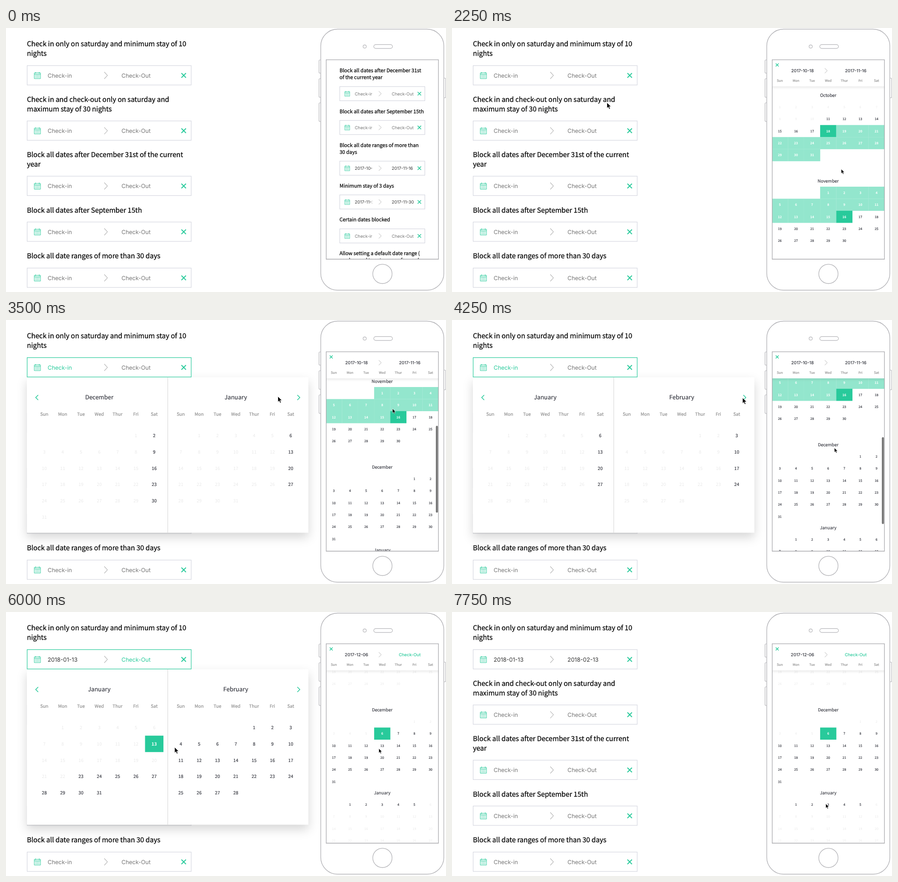
Recreate the animation shown at these times as an HTML page. Size 967 by 579 pixels, loop 9 s.

```html
<!DOCTYPE html>
<html lang="en">
<head>
<meta charset="utf-8">
<title>Date range picker</title>
<style>
  html, body { margin: 0; width: 100%; height: 100%; overflow: hidden; background: #fff; }
  svg { display: block; font-family: "Noto Sans CJK JP", "Noto Sans CJK SC", "Noto Sans CJK", sans-serif; text-rendering: geometricPrecision; }
  .field { font-family: Inter, "Liberation Sans", sans-serif; }
  .line { fill: none; }
  .panel { filter: drop-shadow(0 10px 11px rgba(0, 0, 0, .16)); }
  .hover { filter: drop-shadow(0 1px 3px rgba(0, 0, 0, .4)); }
</style>
</head>
<body>
<svg id="stage" width="967" height="579" viewBox="0 0 967 579"></svg>
<script>
const LOOP = 9000, STEP = 250;
const TEAL = '#28ca9b', RANGE = '#93e6cd', INK = '#2b2d36', OFF = '#e9e9e9', BORDER = '#d5d7e0', OUTLINE = '#b4b4b8';
const WEEK = ['Sun', 'Mon', 'Tue', 'Wed', 'Thur', 'Fri', 'Sat'];
const NAMES = { 9: 'October', 10: 'November', 11: 'December', 12: 'January', 13: 'February' };

// Moments of the story, in ms
const PHONE_OPEN = 2250, PANEL_OPEN = 3000, NEXT_MONTH = 4250, PICKED = 5500, HOVER = 6250, PANEL_CLOSE = 7250;

// Tracks hold each value until the next key
const deskCursor = [[1250, 379, 44], [1500, 347, 123], [1750, 346, 150], [2250, 340, 163], [2500, 294, 104],
  [2750, 288, 101], [3000, 290, 101], [3250, 349, 113], [3500, 597, 167], [3750, 637, 171], [4000, 638, 170],
  [4500, 527, 190], [4750, 368, 234], [5000, 319, 276], [5250, 319, 289], [6000, 370, 296], [6250, 410, 312], [6500, 449, 317]];
const phoneCursor = [[1250, 870, 358], [1500, 829, 335], [1750, 800, 305], [2250, 855, 309], [2500, 851, 314],
  [2750, 853, 370], [3000, 850, 304], [3250, 849, 240], [3500, 849, 194], [3750, 839, 324], [4250, 840, 280],
  [4500, 840, 250], [4750, 841, 236], [5000, 838, 260], [5250, 823, 270], [6000, 819, 299], [6250, 807, 340],
  [6500, 797, 368], [7250, 802, 395], [7500, 817, 419], [7750, 821, 420]];
const scrollTrack = [[0, 0], [3000, 57], [3250, 130], [3500, 201], [3750, 230], [4250, 250], [4500, 290], [4750, 308], [5250, 309]];

const at = (track, t) => track.findLast(key => key[0] <= t);
const dayNo = (month, day) => Date.UTC(2017, month, day) / 864e5;
const weekday = n => (n + 4) % 7;

const text = (x, y, str, size, fill, attrs = '') =>
  `<text x="${x}" y="${y}" font-size="${size}" fill="${fill}" ${attrs}>${str}</text>`;
const centred = (x, y, str, size, fill, attrs = '') => text(x, y, str, size, fill, 'text-anchor="middle" ' + attrs);
const rect = (x, y, w, h, fill, attrs = '') =>
  `<rect x="${x}" y="${y}" width="${w}" height="${h}" fill="${fill}" ${attrs}/>`;
const frame = (x, y, w, h, stroke, r = 0, width = 1.2) =>
  rect(x, y, w, h, '#fff', `rx="${r}" stroke="${stroke}" stroke-width="${width}"`);
const path = (d, stroke, width) => `<path class="line" d="${d}" stroke="${stroke}" stroke-width="${width}"/>`;
const cross = (x, y, r, width) =>
  path(`M${x - r} ${y - r}l${2 * r} ${2 * r}m0 ${-2 * r}l${-2 * r} ${2 * r}`, TEAL, width);
const chevron = (x, y, w, h, stroke, width) => path(`M${x - w} ${y - h}L${x + w} ${y}L${x - w} ${y + h}`, stroke, width);
const heading = (x, y, str, size) => text(x, y, str, size, '#000', 'stroke="#000" stroke-width=".25"');
const cursor = (key, scale) => key ? `<path transform="translate(${key[1]} ${key[2]}) scale(${scale})"
  d="M.5 .5V13L3.4 10.2 5.4 14.9 7.6 14 5.6 9.5H9.5Z" fill="#000" stroke="#fff" stroke-width=".8"/>` : '';

function calendarIcon(x, y, scale) {
  let dots = '';
  for (let i = 0; i < 12; i++) dots += rect(-4.6 + i % 4 * 2.6, -.9 + (i >> 2) * 2.4, 1.4, 1.2, TEAL);
  return `<g transform="translate(${x} ${y}) scale(${scale})">` +
    path('M-6.8 -5.5H6.8V7H-6.8ZM-6.8 -2.3H6.8M-4 -7.5V-4M4 -7.5V-4', TEAL, 1) + dots + '</g>';
}

// A side is [label, colour]
const placeholder = label => [label, '#757575'];
const filled = date => [date, '#333'];
const active = label => [label, TEAL];
const emptySides = [placeholder('Check-in'), placeholder('Check-Out')];

function deskField(y, [from, to] = emptySides, border = BORDER) {
  return frame(46.5, y, 360.5, 42.5, border) + calendarIcon(69, y + 21.5, 1) +
    `<g class="field">${text(91.5, y + 26, from[0], 12.5, from[1])}${text(253.8, y + 26, to[0], 12.5, to[1])}</g>` +
    chevron(219.5, y + 21.5, 3.5, 7.5, '#b5b5b5', 1.1) + cross(390.5, y + 21.5, 5, 2);
}

function phoneField(y, [from, to] = emptySides) {
  return frame(733.5, y, 187, 31, BORDER) + calendarIcon(750, y + 15.5, .8) +
    `<g class="field">${text(766.5, y + 19, from[0], 9.4, from[1])}${rect(804.5, y + 5, 14, 22, '#fff')}
     ${text(847.8, y + 19, to[0], 9.4, to[1])}</g>` +
    chevron(822, y + 15.5, 2.7, 5.5, '#b5b5b5', 1) + cross(908.5, y + 15.5, 3.8, 1.6);
}

// Grid sizes: column pitch, row pitch, title-to-first-row distance, title and day font sizes
const DESK = { dx: 40.25, dy: 35.8, lead: 84.3, title: 13, day: 9.9 };
const PHONE = { dx: 35.4, dy: 26.4, lead: 26.2, title: 9.5, day: 7.2 };

function month(index, x, y, grid, stateOf) {
  const first = dayNo(index, 1), count = dayNo(index + 1, 1) - first;
  let out = centred(x + 3 * grid.dx, y + grid.title * .37, NAMES[index], grid.title, INK, `stroke="${INK}" stroke-width=".12"`);
  for (let d = 0; d < count; d++) {
    const n = first + d, cell = d + weekday(first), state = stateOf(n);
    const cx = x + cell % 7 * grid.dx, cy = y + grid.lead + Math.floor(cell / 7) * grid.dy;
    const back = { range: RANGE, pick: TEAL, hover: '#fff' }[state];
    const ink = { range: '#fff', pick: '#fff', hover: TEAL, on: INK }[state] || OFF;
    if (back) out += rect(cx - grid.dx / 2, cy - grid.dy / 2, grid.dx + .2, grid.dy + .2, back, state == 'hover' ? 'class="hover"' : '');
    out += centred(cx, cy + grid.day * .37, d + 1, grid.day, ink,
      back ? 'font-weight="700"' : state == 'on' ? `stroke="${ink}" stroke-width=".15"` : '');
  }
  return out;
}

const weekdays = (x, y, dx, size) =>
  WEEK.map((name, i) => centred(x + i * dx, y, name, size, '#8e8e8e', 'stroke="#8e8e8e" stroke-width=".2"')).join('');

function panel(t) {
  const start = dayNo(12, 13), end = dayNo(13, t < 6500 ? 12 : 13);
  const stateOf = n => {
    if (t < PICKED) return weekday(n) == 6 ? 'on' : 'off';
    if (n == start) return 'pick';
    if (t >= HOVER && n == end) return 'hover';
    if (t >= HOVER && n > start && n < end) return 'range';
    return n >= start + 10 ? 'on' : 'off';
  };
  const left = t < NEXT_MONTH ? 11 : 12;
  let out = rect(46, 125.5, 618.5, 341, '#fff', 'class="panel"') + path('M355.5 126V466.5', '#d4d4d4', 1) +
    path('M46 467.3H407', '#d0d0d0', .8) +
    chevron(68, 170, -2.7, 5.5, TEAL, 1.6) + chevron(643, 170, 2.7, 5.5, TEAL, 1.6);
  [84.2, 384.2].forEach((x, i) => {
    out += weekdays(x, 209.7, DESK.dx, 9.9) + month(left + i, x, 169, DESK, stateOf);
  });
  if (t >= HOVER) {
    const x = 448.5 - (dayNo(13, 13) - end) * DESK.dx;
    out += rect(x, 285.3, 56.5, 21.5, '#2b2c44', 'rx="2"') +
      `<path d="M${x + 25} 306.5h7l-3.5 3.5z" fill="#2b2c44"/>` +
      centred(x + 28.3, 299.7, `${end - start} Nights`, 9.2, '#fff', 'stroke="#fff" stroke-width=".3"');
  }
  return out;
}

function desk(t) {
  const open = t >= PANEL_OPEN && t < PANEL_CLOSE;
  const from = t >= PICKED ? filled('2018-01-13') : open ? active('Check-in') : emptySides[0];
  const to = t >= PANEL_CLOSE ? filled('2018-02-13') : t >= PICKED ? active('Check-Out') : emptySides[1];
  const lines = [[40, 'Check in only on saturday and minimum stay of 10'], [61, 'nights'],
    [162, 'Check in and check-out only on saturday and'], [183, 'maximum stay of 30 nights'],
    [283, 'Block all dates after December 31st of the current'], [304, 'year'],
    [404.5, 'Block all dates after September 15th'], [505, 'Block all date ranges of more than 30 days']];
  return lines.slice(0, -1).map(([y, str]) => heading(46, y, str, 15)).join('') +
    [203.8, 325, 425.5].map(y => deskField(y)).join('') + (open ? panel(t) : '') +
    deskField(82.5, [from, to], open ? TEAL : BORDER) + heading(46, ...lines.at(-1), 15) + deskField(526.5) +
    (t < PANEL_CLOSE ? cursor(at(deskCursor, t), 1) : '');
}

function phoneForm() {
  const lines = [[97, 'Block all dates after December 31st'], [112, 'of the current year'],
    [187, 'Block all dates after September 15th'], [260.7, 'Block all date ranges of more than'], [275.7, '30 days'],
    [349.5, 'Minimum stay of 3 days'], [424, 'Certain dates blocked'], [498, 'Allow setting a default date range ('],
    [513, 'can be used to set a range forward']];
  return lines.map(([y, str]) => heading(733, y, str, 11)).join('') +
    [128.5, 202.7, 440.5].map(y => phoneField(y)).join('') +
    phoneField(292, [filled('2017-10-18'), filled('2017-11-16')]) +
    phoneField(366, [filled('2017-11-27'), filled('2017-11-30')]);
}

function phoneCalendar(t) {
  const picked = t >= PICKED, scroll = at(scrollTrack, t)[1];
  const start = picked ? dayNo(11, 6) : dayNo(9, 18), end = dayNo(10, 16);
  const stateOf = n => {
    if (n == start || !picked && n == end) return 'pick';
    if (picked) return n > start && n <= start + 30 ? 'on' : 'off';
    return n > start && n < end ? 'range' : n >= dayNo(9, 11) ? 'on' : 'off';
  };
  const titles = [147, 335, 523, 705];
  let out = titles.map((y, i) => month(9 + i, 720.6, y - scroll, PHONE, stateOf)).join('');
  if (t >= PANEL_OPEN && !picked) out += rect(944.7, 130 + scroll * .508, 4.6, 190.5, '#777', 'rx="2.3"');
  return out + rect(704, 70, 246, 58, '#fff') + rect(704, 128, 246, 7, 'url(#fade)') + cross(714.7, 81, 3.2, 1.5) +
    weekdays(720.6, 118.3, PHONE.dx, 7.2) + chevron(822, 93.7, 2.7, 5.5, '#b5b5b5', 1) +
    `<g class="field" font-weight="500">${centred(770.3, 97.3, picked ? '2017-12-06' : '2017-10-18', 9.4, INK)}
     ${centred(887.3, 97.3, picked ? 'Check-Out' : '2017-11-16', 9.3, picked ? TEAL : INK)}</g>`;
}

function phone(t) {
  const buttons = [[688, 70, 29], [688, 111, 41], [688, 164, 41], [960, 110, 43]];
  return buttons.map(([x, y, h]) => frame(x, y, 6.5, h, OUTLINE, 2)).join('') +
    frame(691.7, 2.5, 270.6, 572.5, OUTLINE, 37, 1.4) + frame(808.3, 36.3, 41, 8.6, OUTLINE, 4.3) +
    `<circle cx="788.3" cy="40.7" r="3.5" fill="#fff" stroke="${OUTLINE}" stroke-width="1.2"/>
     <circle cx="827.3" cy="539.3" r="21.2" fill="#fff" stroke="${OUTLINE}" stroke-width="1.3"/>
     <g clip-path="url(#screen)">${t < PHONE_OPEN ? phoneForm() : phoneCalendar(t)}</g>` +
    path('M703.7 69.6H950.4V507H703.7Z', '#a9a9ad', 1.3) + cursor(at(phoneCursor, t), .78);
}

const defs = `<defs><clipPath id="screen">${rect(704, 70, 246, 437, '#000')}</clipPath>
  <linearGradient id="fade" x2="0" y2="1"><stop stop-color="#000" stop-opacity=".07"/><stop offset="1" stop-opacity="0"/></linearGradient></defs>`;
const stage = document.getElementById('stage');
let shown = -1;

function draw() {
  const t = Math.floor(performance.now() % LOOP / STEP) * STEP;
  if (t !== shown) stage.innerHTML = defs + desk(t) + phone(t);
  shown = t;
  requestAnimationFrame(draw);
}
draw();
</script>
</body>
</html>
```
